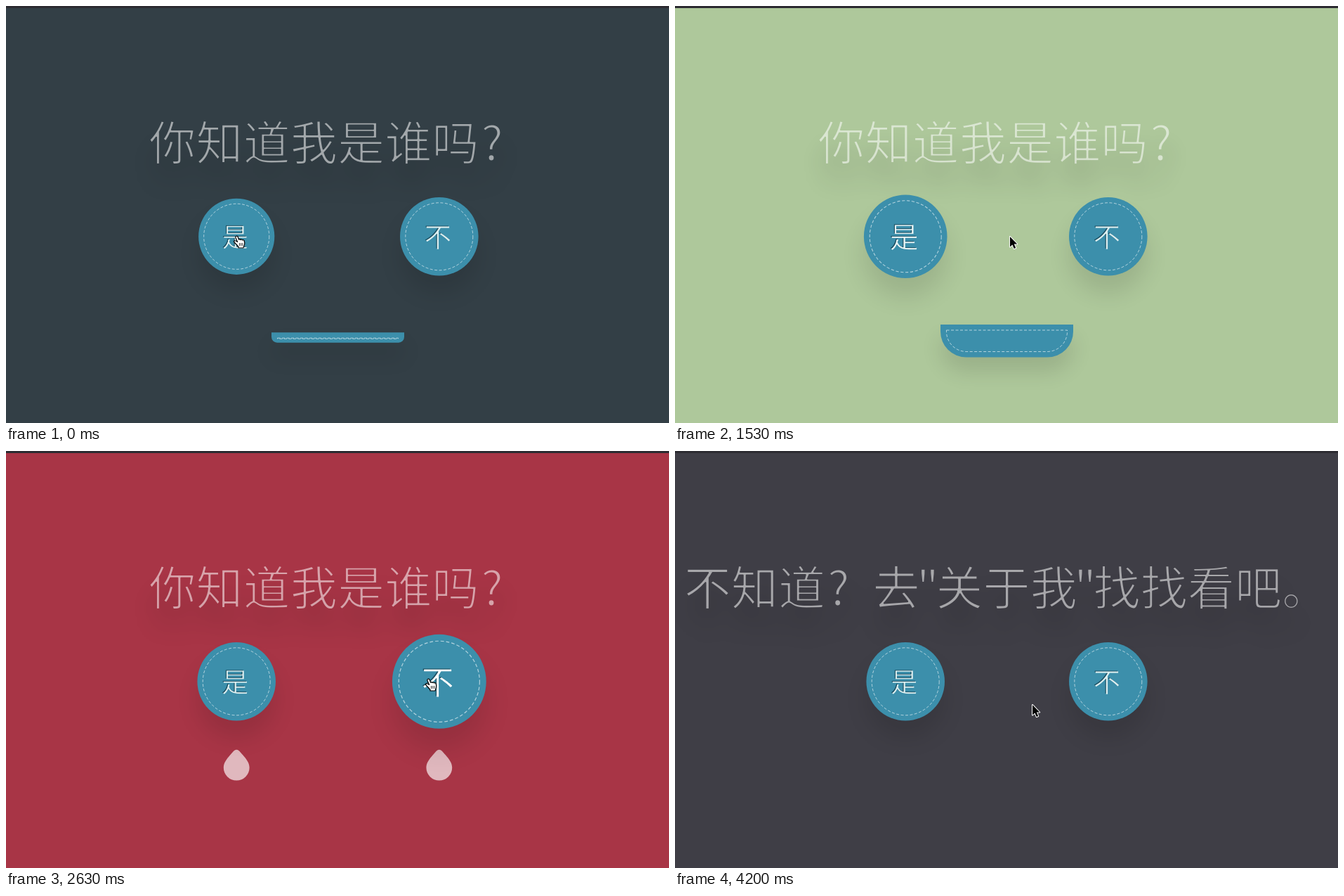
Animation, 944 px wide and 593 px high, one loop 4.23 s. Source, as an HTML page with a canvas:

```html
<!DOCTYPE html>
<html lang="zh-CN">
<head>
<meta charset="utf-8">
<title>你知道我是谁吗？</title>
<style>
html, body { margin: 0; width: 100%; height: 100%; overflow: hidden; background: #344047; }
canvas { display: block; width: 944px; height: 593px; }
</style>
</head>
<body>
<canvas id="stage" width="944" height="593"></canvas>
<script>
const ctx = document.getElementById('stage').getContext('2d');
const LOOP = 4230;
const FONT = '"Noto Sans CJK SC", "Noto Sans CJK", sans-serif';
const BLUE = '#3c8fab';
const DARK = [51, 63, 70], GREEN = [178, 204, 158], RED = [168, 53, 70];

// Times at which the pointer is over each eye
const YES_HOVER = [[-65, 1410]];
const NO_HOVER = [[1655, 2770], [3560, 3760]];
const FADES = [[0, GREEN], [1410, DARK], [1650, RED], [2770, DARK], [3560, RED], [3760, DARK]];
const POINTER = [
  [0, 327, 327], [430, 320, 328], [900, 327, 329], [1250, 329, 329], [1410, 395, 330],
  [1655, 561, 326], [1850, 597, 321], [1970, 597, 321], [2630, 600, 324],
  [2770, 601, 323], [3560, 601, 323], [3760, 560, 337], [4000, 509, 361], [LOOP, 509, 361]
];

const clamp = v => Math.max(0, Math.min(1, v));
const mix = (a, b, k) => a + (b - a) * k;

function bezier(x1, y1, x2, y2) {
  const at = (a, b, s) => 3 * a * s * (1 - s) ** 2 + 3 * b * s * s * (1 - s) + s ** 3;
  return x => {
    if (x <= 0) return 0;
    if (x >= 1) return 1;
    let lo = 0, hi = 1;
    for (let i = 0; i < 24; i++) {
      const mid = (lo + hi) / 2;
      if (at(x1, x2, mid) < x) lo = mid; else hi = mid;
    }
    return at(y1, y2, lo);
  };
}
const ease = bezier(0.25, 0.1, 0.25, 1);
const easeInOut = bezier(0.42, 0, 0.58, 1);

function background(t) {
  let color = DARK;
  FADES.forEach(([start, target], i) => {
    if (t < start) return;
    const end = i + 1 < FADES.length ? Math.min(t, FADES[i + 1][0]) : t;
    const k = easeInOut((end - start) / 1000);
    color = color.map((c, j) => mix(c, target[j], k));
  });
  return `rgb(${color.map(Math.round)})`;
}

// Shrink first, then swell
function pop(ms) {
  const k = ms / 500;
  return k < 1 ? mix(1, 0.8, ease(k)) : mix(0.8, 1.2, ease(k - 1));
}

function eyeScale(t, spans) {
  let scale = 1;
  for (const [start, end] of spans) {
    if (t < start) break;
    scale = t < end ? pop(t - start) : mix(pop(end - start), 1, ease((t - end) / 300));
  }
  return scale;
}

const hovered = (t, spans) => spans.some(([a, b]) => t >= a && t < b);

// Vertical offset of the title and the eyes
function slide(t) {
  if (t < 2770) return 0;
  if (t < 2988) return 520 * ((t - 2770) / 218) ** 2;
  const ms = t - 2988;
  if (ms < 600) return mix(2000, -30, ease(ms / 600));
  if (ms < 800) return mix(-30, 10, ease((ms - 600) / 200));
  return mix(10, 0, ease((ms - 800) / 200));
}

function shadow(alpha, y, blur) {
  ctx.shadowColor = `rgba(0,0,0,${alpha})`;
  ctx.shadowOffsetX = 0;
  ctx.shadowOffsetY = y;
  ctx.shadowBlur = blur;
}

function dashes() {
  ctx.strokeStyle = 'rgba(255,255,255,.6)';
  ctx.lineWidth = 1;
  ctx.setLineDash([4, 2.5]);
  ctx.stroke();
  ctx.setLineDash([]);
}

// Text layer whose strokes are trimmed to imitate a light weight
function lightText(w, h, size, trim, color, parts) {
  const layer = document.createElement('canvas');
  layer.width = w * 2;
  layer.height = h * 2;
  const c = layer.getContext('2d');
  c.scale(2, 2);
  c.font = `${size}px ${FONT}`;
  c.textAlign = 'center';
  c.lineJoin = 'round';
  c.lineWidth = trim;
  c.fillStyle = color;
  for (const [text, x, y] of parts) c.fillText(text, x, y);
  c.globalCompositeOperation = 'destination-out';
  for (const [text, x, y] of parts) c.strokeText(text, x, y);
  return layer;
}

const EM = 67.2, QUOTE = 22.6;

function titleLayer(text) {
  const widths = [...text].map(ch => ch === '"' ? QUOTE : EM);
  let x = (944 - widths.reduce((a, b) => a + b)) / 2;
  const parts = [...text].map((ch, i) => {
    const center = x + (ch === '?' ? 18.5 : widths[i] / 2);
    x += widths[i];
    return [ch, center, 79.5];
  });
  return lightText(944, 110, EM, 2.1, '#fff', parts);
}

const QUESTION = titleLayer('你知道我是谁吗?');
const ANSWER = titleLayer('不知道?去"关于我"找找看吧。');
const labelLayer = (text, color) => lightText(50, 50, 38.4, 0.8, color, [[text, 25, 38]]);
const label = text => ['#1d4f62', '#def0f1', '#fff'].map(color => labelLayer(text, color));
const YES = label('是'), NO = label('不');

function title(dy, asked) {
  ctx.save();
  ctx.globalAlpha = 0.55;
  shadow(0.45, 32, 30);
  ctx.drawImage(asked ? ANSWER : QUESTION, 0, 140 + dy, 944, 110);
  ctx.restore();
}

function eye(x, y, scale, [dark, pale, white]) {
  ctx.save();
  ctx.translate(x, y);
  ctx.scale(scale, scale);
  ctx.save();
  shadow(0.11, 25 * scale, 32 * scale);
  ctx.fillStyle = BLUE;
  ctx.beginPath();
  ctx.arc(0, 0, 55.8, 0, 7);
  ctx.fill();
  ctx.restore();
  ctx.beginPath();
  ctx.arc(0, 0, 48, 0, Math.PI * 2);
  dashes();
  ctx.drawImage(dark, -28, -23.8, 50, 50);
  ctx.drawImage(pale, -26.8, -22.8, 50, 50);
  ctx.globalAlpha = clamp((scale - 1) / 0.2);
  ctx.drawImage(white, -26.8, -22.8, 50, 50);
  ctx.restore();
}

function mouth(t) {
  const open = t < 1410 ? ease((t + 65) / 500) : 1 - ease((t - 1410) / 400);
  const h = 96.5 * open;
  if (h < 0.5) return;
  const top = 435.5 + (96.5 - h) * 0.35;
  const r = 94.5 * open ** 1.3;
  ctx.save();
  shadow(0.12, 20, 30);
  ctx.fillStyle = BLUE;
  ctx.beginPath();
  ctx.roundRect(378, top, 189, h, [0, 0, r, r]);
  ctx.fill();
  ctx.restore();
  if (h < 12) return;
  const inner = Math.max(0, r - 8);
  ctx.beginPath();
  ctx.roundRect(386.5, top + 8, 172, Math.max(1, h - 16), [0, 0, inner, inner]);
  dashes();
}

const DROP = new Path2D('M0 -25.5C3 -25.5 5 -22.5 9 -18C14 -12 18.4 -7 18.4 0' +
  'A18.4 18.4 0 0 1 -18.4 0C-18.4 -7 -14 -12 -9 -18C-5 -22.5 -3 -25.5 0 -25.5Z');

function tears(t) {
  const ms = t - 2243;
  if (ms < 0 || ms > 650) return;
  ctx.fillStyle = 'rgba(255,255,255,.65)';
  for (const x of [328.2, 616.8]) {
    ctx.save();
    ctx.translate(x, 331.5 + 0.000788 * ms * ms);
    ctx.fill(DROP);
    ctx.restore();
  }
}

const ARROW = new Path2D('M0 0V14.5L3.4 11.4L5.8 17L8.2 16L5.8 10.6H10.2Z');
const HAND = new Path2D('M1.5 0C0 .2 -.5 1.5 0 2.6L2.6 8.5C1 7 -1.5 6.5 -2.5 7.5' +
  'C-3 8.5 -1 10 1 12L4 15.5V17H11C11.5 14.5 13 12.5 12.8 9.5L12 6.5' +
  'C11.5 5.3 10 5.3 9.6 6C9.2 4.8 7.5 4.6 7 5.6C6.5 4.4 5 4.5 4.6 5.2L3 1C2.7 .3 2 0 1.5 0Z');
const CREASES = new Path2D('M5.5 10V14M7.7 10V14M9.9 10V14');

function pointer(t) {
  const i = POINTER.findIndex(p => p[0] > t);
  const a = POINTER[i - 1], b = POINTER[i];
  const k = (t - a[0]) / (b[0] - a[0]);
  ctx.save();
  ctx.translate(mix(a[1], b[1], k), mix(a[2], b[2], k));
  ctx.lineJoin = 'round';
  if (hovered(t, YES_HOVER) || hovered(t, NO_HOVER)) {
    ctx.fillStyle = '#fff';
    ctx.strokeStyle = '#000';
    ctx.lineWidth = 1.2;
    ctx.fill(HAND);
    ctx.stroke(HAND);
    ctx.lineWidth = 0.8;
    ctx.stroke(CREASES);
  } else {
    ctx.fillStyle = '#000';
    ctx.strokeStyle = '#fff';
    ctx.lineWidth = 2;
    ctx.stroke(ARROW);
    ctx.fill(ARROW);
  }
  ctx.restore();
}

function draw(t) {
  ctx.fillStyle = background(t);
  ctx.fillRect(0, 0, 944, 593);
  const dy = slide(t);
  title(dy, t >= 2988);
  mouth(t);
  tears(t);
  eye(328.2, 327.8 + dy, eyeScale(t, YES_HOVER), YES);
  eye(616.8, 327.8 + dy, eyeScale(t, NO_HOVER), NO);
  ctx.fillStyle = '#2d2c32';
  ctx.fillRect(0, 0, 944, 3);
  pointer(t);
}

const begin = performance.now();
function frame() {
  draw((performance.now() - begin) % LOOP);
  requestAnimationFrame(frame);
}
frame();
</script>
</body>
</html>
```
